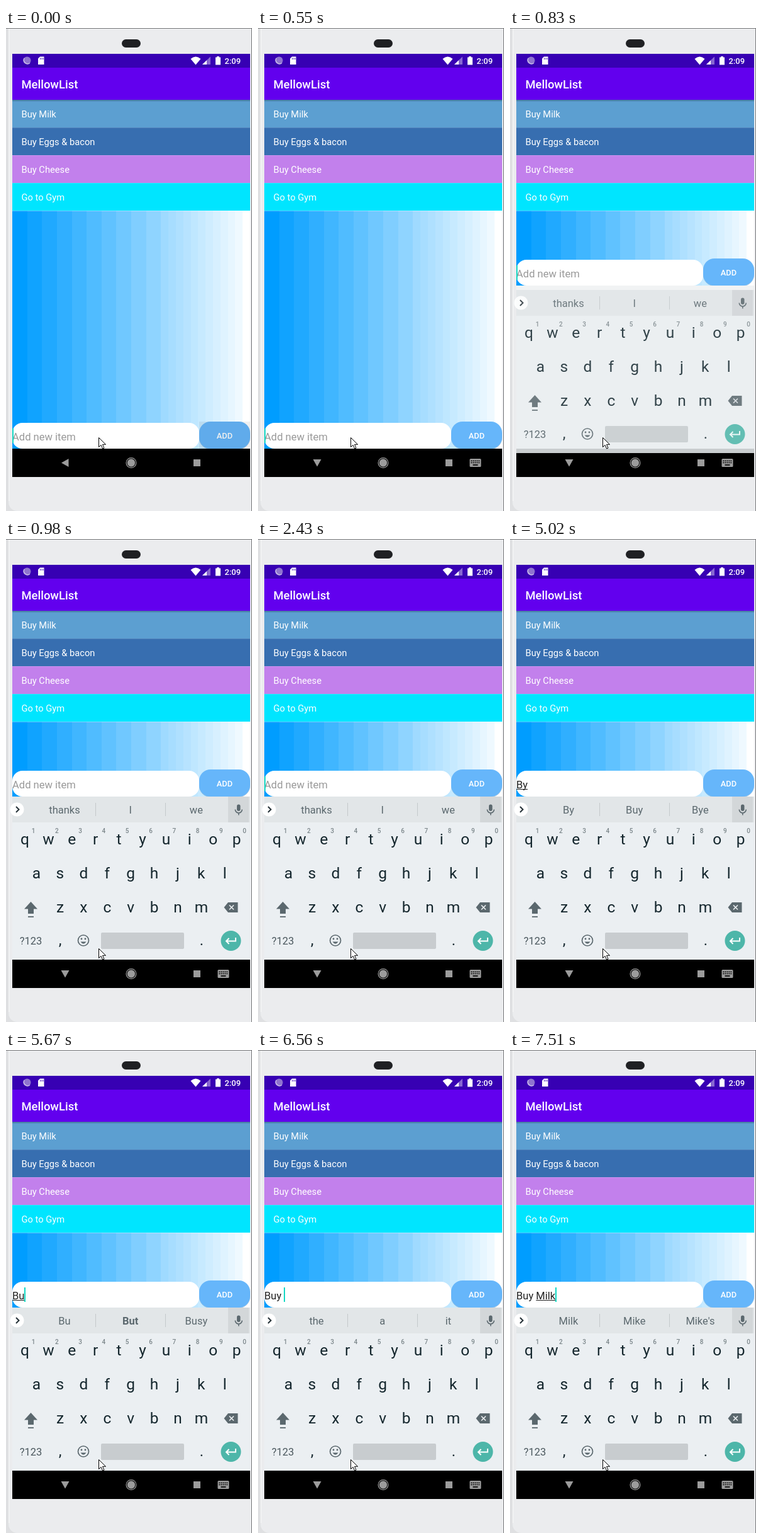
Animation, 391 px wide and 767 px high, one loop 8 s. Source, as an HTML page with a canvas:

```html
<!DOCTYPE html>
<html lang="en">
<head>
<meta charset="utf-8">
<style>
html, body { margin: 0; width: 100%; height: 100%; overflow: hidden; background: #ebecee; }
canvas { display: block; }
</style>
</head>
<body>
<canvas id="stage" width="391" height="767"></canvas>
<script>
const c = document.getElementById('stage').getContext('2d');
const LOOP = 8000;

const START = ['thanks', 'I', 'we'];
const B = ['B', 'Be', 'But'];
const BUY = ['Buy', 'Buys', 'Buying'];

// [time, committed text, word being composed, caret shown, suggestions]
const STEPS = [
  [0, '', '', 1, START],
  [980, '', '', 0, START],
  [1510, '', '', 1, START],
  [1910, '', '', 0, START],
  [2430, '', '', 1, START],
  [2930, '', '', 0, START],
  [3080, '', 'B', 1, START],
  [3200, '', 'B', 1, B],
  [3470, '', 'B', 0, B],
  [3970, '', 'B', 1, B],
  [4500, '', 'By', 1, ['By', 'Buy', 'Bye']],
  [5020, '', 'By', 0, ['By', 'Buy', 'Bye']],
  [5270, '', 'B', 1, ['By', 'Buy', 'Bye']],
  [5390, '', 'B', 1, B],
  [5670, '', 'Bu', 1, ['Bu', '*But', 'Busy']],
  [5940, '', 'Buy', 1, BUY],
  [6320, 'Buy ', '', 1, BUY],
  [6440, 'Buy ', '', 1, ['the', 'a', 'it']],
  [6840, 'Buy ', 'M', 1, ['M', 'Me', 'My']],
  [6980, 'Buy ', 'Mi', 1, ['Mi', 'Milk', 'Mike']],
  [7260, 'Buy ', 'Mil', 1, ['Mil', 'Milk', 'Mike']],
  [7510, 'Buy ', 'Milk', 1, ['Milk', 'Mike', "Mike's"]]
];

const ITEMS = [
  ['Buy Milk', '#5c9fd1'], ['Buy Eggs & bacon', '#376eb0'],
  ['Buy Cheese', '#c280ec'], ['Go to Gym', '#00e5ff']
];

function rect(x, y, w, h, fill) {
  c.fillStyle = fill;
  c.fillRect(x, y, w, h);
}

function round(x, y, w, h, r, fill) {
  c.fillStyle = fill;
  c.beginPath();
  c.roundRect(x, y, w, h, r);
  c.fill();
}

function disc(x, y, r, fill) {
  c.fillStyle = fill;
  c.beginPath();
  c.arc(x, y, r, 0, 7);
  c.fill();
}

function shape(path, fill, stroke, width = 1) {
  const p = new Path2D(path);
  if (fill) { c.fillStyle = fill; c.fill(p); }
  if (stroke) { c.strokeStyle = stroke; c.lineWidth = width; c.stroke(p); }
}

function text(s, x, y, size, fill, weight = 400, align = 'left') {
  c.font = `${weight} ${size}px Roboto, sans-serif`;
  c.textAlign = align;
  c.fillStyle = fill;
  c.fillText(s, x, y);
  return c.measureText(s).width;
}

function phone() {
  rect(0, 0, 391, 767, '#dfe0e2');
  round(4, -20, 400, 787, 14, '#ebecee');
  rect(4, 1, 1.5, 750, '#f4f5f6');
  rect(0, 0, 391, 1, '#77787a');
  rect(390, 0, 1, 767, '#77787a');
  round(184, 18, 30, 13, 6.5, '#1f2023');
}

function statusBar() {
  rect(10, 41, 378, 22, '#3700b3');
  disc(33.5, 51.5, 6, '#8f74cf');
  shape('M29 48 A6 6 0 0 0 38 55.5', null, '#c9bce9', 1.5);
  shape('M54 45.5H60.5V58H51V48.5Z', '#fff');
  shape('M54.5 47.5V50M56.8 47.5V50M59 47.5V50', null, '#3700b3', .9);
  shape('M293.5 49Q301.5 42 309.5 49L301.5 58.5Z', '#fff');
  shape('M325 45.5V58H312Z', 'rgba(255,255,255,.4)');
  shape('M319 51.3V58H312Z', '#fff');
  shape('M333 46.5H335.3V45H338.7V46.5H341V58.5H333Z', '#fff');
  text('2:09', 347.5, 56.5, 13, '#fff', 500);
}

function background() {
  for (let i = 0; i < 32; i++) {
    const k = i < 20 ? i >> 1 : i / 2;
    const f = i === 31 ? 1 : k / 16;
    const x = Math.round(10 + i * 11.8125);
    rect(x, 290, 388 - x, 378, `rgb(${255 * f},${157 + 98 * f},255)`);
  }
}

function list() {
  rect(10, 63, 378, 51, '#6200ee');
  text('MellowList', 24.5, 95.5, 18.4, '#fff', 500);
  ITEMS.forEach(([label, fill], i) => {
    const y = 114 + 44 * i;
    rect(10, y, 378, 44, fill);
    if (i) rect(10, y, 378, 1, 'rgba(255,255,255,.15)');
    text(label, 24.5, y + 28, 14.7, '#fff');
  });
  rect(10, 290, 378, 1, 'rgba(255,255,255,.35)');
  for (let i = 0; i < 3; i++) rect(10, 114 + i, 378, 1, `rgba(0,0,0,${.24 - .08 * i})`);
}

function entry(y, [, done, word, caret], press) {
  const base = y + 27.5;
  round(10, y, 297, 41, 16, '#fff');
  round(307, y - 1, 81, 43, 18, 'rgba(40,110,170,.35)');
  round(307, y - 2, 81, 43, 18, '#66b6fa');
  text('ADD', 347.5, y + 24.5, 12.9, '#fff', 500, 'center');
  if (press) rect(307, y - 2, 81, 43, `rgba(0,0,0,${press})`);

  let x = 10;
  if (done || word) {
    x += text(done, x, base, 16.56, '#212121');
    const w = text(word, x, base, 16.56, '#212121');
    rect(x, Math.round(base) + 1, w, 1, '#212121');
    x += w;
  } else {
    text('Add new item', x, base, 16.56, '#999');
  }
  if (caret) rect(Math.round(x), y + 9, 2, 23, '#14d8c4');
}

function keyRow(keys, x, y) {
  [...keys].forEach((k, i) => text(k, x + 37.4 * i, y, 24.5, '#14262d', 400, 'center'));
}

function keyboard(words) {
  const ink = '#5b686e';
  rect(10, 409, 378, 259, '#ebeff2');
  rect(10, 409, 378, 41, '#e2e6e8');
  rect(353, 409, 33, 41, '#d3d7d9');
  disc(17.5, 429.5, 11, '#fff');
  shape('M16 425L20.5 429.5L16 434', null, '#263238', 2);
  words.forEach((w, i) => {
    const bold = w[0] === '*';
    text(bold ? w.slice(1) : w, 93 + 104.7 * i, 436, 16.5, ink, bold ? 700 : 400, 'center');
  });
  rect(142, 419, 1, 21, '#c4c9cb');
  rect(253, 419, 1, 21, '#c4c9cb');
  round(367, 421.5, 5.5, 10.5, 2.75, ink);
  shape('M364.3 429.5A5.5 5.5 0 0 0 375.3 429.5M369.8 435V438.5', null, ink, 1.6);

  keyRow('qwertyuiop', 30, 485);
  [...'1234567890'].forEach((d, i) =>
    text(d, 43.5 + 37.3 * i, 466.5, 10, '#7b868a', 500, 'center'));
  keyRow('asdfghjkl', 48.5, 539);
  keyRow('zxcvbnm', 86, 593);
  shape('M39.5 576L50 587.5H44V595H35V587.5H29Z', ink);
  rect(35, 599, 9, 1.8, ink);
  shape('M353 577H368.5V593H353L346.5 585Z', ink);
  shape('M355 581.5L362 588.5M362 581.5L355 588.5', null, '#ebeff2', 1.7);

  text('?123', 39.5, 644, 16.5, '#4b585e', 400, 'center');
  text(',', 86, 645, 24, '#14262d', 400, 'center');
  text('.', 311, 645, 24, '#14262d', 400, 'center');
  shape('M131.5 637.5A8.5 8.5 0 1 1 114.5 637.5A8.5 8.5 0 1 1 131.5 637.5', null, ink, 1.7);
  disc(120, 635, 1.4, ink);
  disc(126, 635, 1.4, ink);
  shape('M118.5 639.5H127.5Q123 646 118.5 639.5', ink);
  round(151, 625, 132, 26, 2, '#c8cccf');
  disc(357.5, 638, 16, '#4db6a9');
  shape('M365 633V638.5H350.5M354.5 634L350 638.5L354.5 643', null, '#fff', 2);
}

function navBar(turn, ime) {
  const grey = '#9c9c9c';
  c.save();
  c.translate(94, 690.5);
  c.rotate(-turn * Math.PI / 2);
  shape('M-6 0L5.5 -6.5V6.5Z', grey);
  c.restore();
  disc(199, 690.5, 8.5, grey);
  disc(199, 690.5, 7.3, '#000');
  disc(199, 690.5, 6.2, grey);
  rect(298, 685, 11, 11, grey);
  if (!ime) return;
  round(336.5, 684, 18, 13, 1.5, grey);
  for (let i = 0; i < 5; i++) {
    rect(338.5 + 3 * i, 686.5, 1.7, 1.7, '#000');
    rect(338.5 + 3 * i, 689.5, 1.7, 1.7, '#000');
  }
  rect(341.5, 693, 8, 1.7, '#000');
}

function draw(t) {
  const step = STEPS.findLast(s => s[0] <= t);
  const open = t >= 830;
  const turn = t < 430 ? 0 : t < 550 ? .5 : 1;
  phone();
  statusBar();
  background();
  list();
  entry(open ? 368 : 627, step, .06 * (1 - turn));
  rect(10, 668, 378, 45, '#000');
  if (open) {
    const arriving = t < 980;
    c.save();
    if (arriving) {
      rect(10, 409, 378, 259, '#f1f3f4');
      c.globalAlpha = .86;
      c.translate(0, 7);
    }
    keyboard(step[4]);
    c.restore();
  }
  navBar(turn, turn > 0);
  shape('M147.5 650.5V665.5L151 662.2L153.6 668L156 667L153.5 661.3H158.5Z', '#fff', '#000');
}

function tick(now) {
  draw(now % LOOP);
  requestAnimationFrame(tick);
}
draw(0);
requestAnimationFrame(tick);
</script>
</body>
</html>
```
